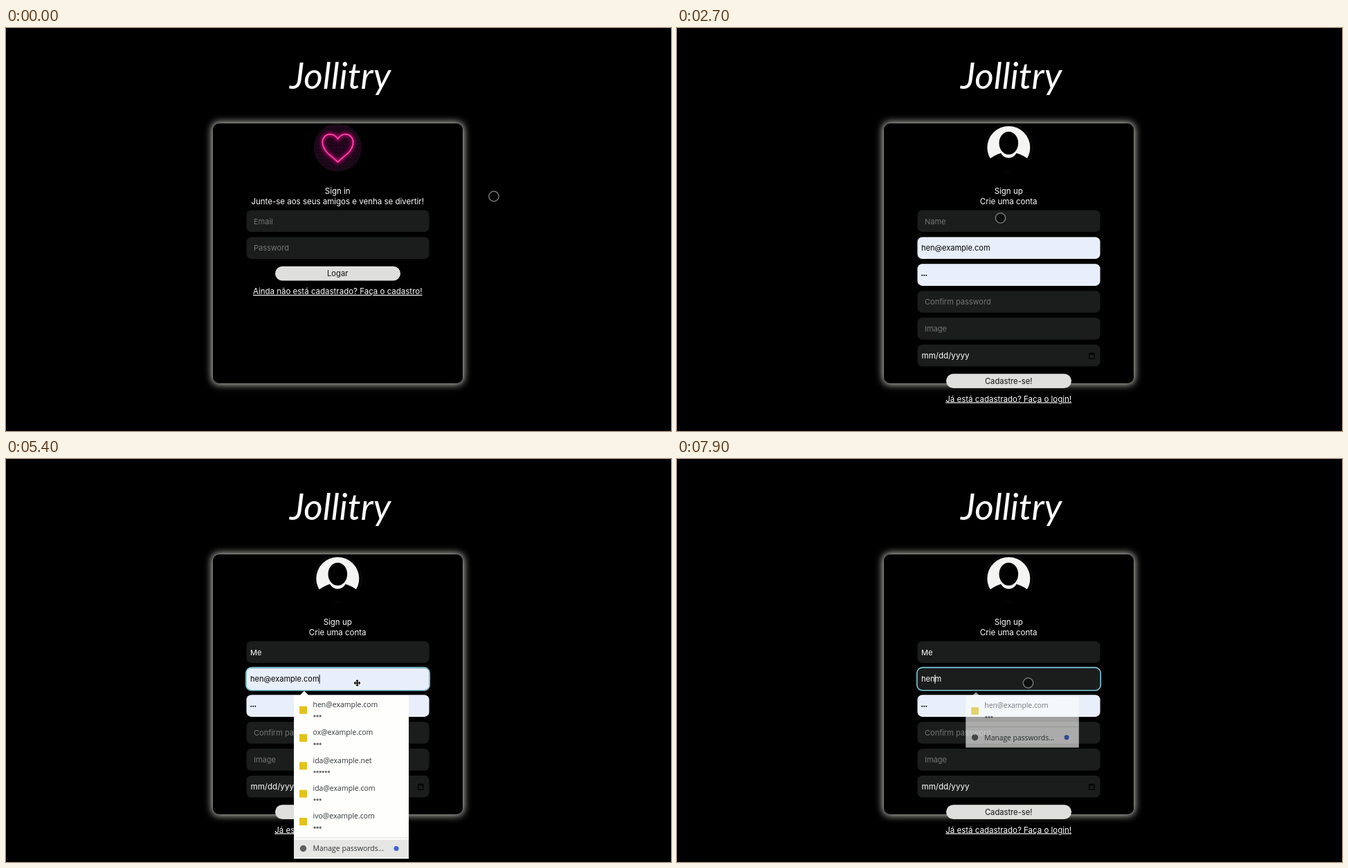
An HTML page that plays this animation: 961x583 px, repeating every 8 s.

```html
<!DOCTYPE html>
<html lang="pt">
<head>
<meta charset="utf-8">
<style>
  html, body { margin: 0; width: 100%; height: 100%; overflow: hidden; background: #000; }
  svg { display: block; position: relative; font: 11.5px Inter, sans-serif; fill: #fff; }
  .card { position: absolute; left: 299px; top: 138px; width: 361px; height: 376px;
          border-radius: 9px; box-shadow: 0 0 11px 1.5px #cfcfc6; background: #000; }
  .title { font: italic 53px Lato, sans-serif; }
  .mid { text-anchor: middle; }
  .link { text-decoration: underline; }
  .field { font-size: 11px; }
  .label { font-size: 11.2px; fill: #111; }
  .hint { fill: #757575; }
  .popup { font: 10.5px "Open Sans", sans-serif; fill: #2e3436; transform-origin: 499px 450px; }
</style>
</head>
<body>
<div class="card"></div>
<svg id="stage" width="961" height="583" viewBox="0 0 961 583"></svg>
<script>
const LOOP = 8000, EMAIL = 'hen@example.com';
const SAVED = [[EMAIL, 3], ['ox@example.com', 3], ['ida@example.net', 6], ['ida@example.com', 3], ['ivo@example.com', 3]];
const rowY = i => 263.5 + i * 38.9;

const text = (x, y, s, attrs = '') => `<text x="${x}" y="${y}" ${attrs}>${s}</text>`;
const rect = (x, y, w, h, r, attrs) => `<rect x="${x}" y="${y}" width="${w}" height="${h}" rx="${r}" ${attrs}/>`;
const centered = (y, s, cls = '') => text(479.2, y, s, `class="mid ${cls}"`);
const box = (i, attrs = 'fill="#1b1d1d"') => rect(347.5, rowY(i), 264, 31.6, 7, attrs);
const value = (i, s, attrs, x = 353) => text(x, rowY(i) + 20, s, `class="field" ${attrs}`);
const hint = (i, s, id = '') => text(358, rowY(i) + 20, s, `class="field hint" id="${id}"`);
const ring = i => rect(346.8, rowY(i) - .8, 265.4, 33.2, 8, `id="ring${i}" fill="none" stroke="#7fd0df" stroke-width="1.6"`);
const button = (y, s) => rect(389, y, 181, 20.8, 10.4, 'fill="#dfe0de"') + centered(y + 14.5, s, 'label');
const dots = (x, y, n, step, r, attrs) =>
  Array.from({length: n}, (_, i) => `<circle cx="${x + i * step}" cy="${y}" r="${r}" ${attrs}/>`).join('');

function popup(id, count) {
  const sep = 547.5 - (5 - count) * 40.35, bottom = sep + 30.8;
  const rows = SAVED.slice(0, count).map(([mail, n], i) => {
    const y = 342 + i * 40.35;
    return rect(424, y + 15.7, 11, 11, 0, 'fill="#e3c21c"') + text(443.5, y + 17, mail) +
      dots(446, y + 29.8, n, 4.1, 1.6, 'fill="#666"');
  }).join('');
  return `<g id="${id}" class="popup">
    <path d="M416 342H424.5L431 335.5L437.5 342H582V${bottom}H416Z" fill="#fefefc"/>
    ${rect(416, 505, 166, 40, 0, `id="${id}Row" fill="#e6e6e4" display="none"`)}
    ${rect(416, sep + 3.3, 166, 25.5, 0, `id="${id}Manage" fill="#e6e6e4" display="none"`)}
    ${rows}
    ${rect(416, sep, 166, 1, 0, 'fill="#dededc"')}
    <circle cx="429.5" cy="${sep + 16}" r="4.7" fill="#5c5f61"/>
    ${text(443.5, sep + 19.8, 'Manage passwords…')}
    <circle cx="564" cy="${sep + 16}" r="3.5" fill="#3f64d8"/>
  </g>`;
}

const heart = `M479.5 160.5C475 153 466 151.5 460.5 157C455 163 457.5 172 462 178C467 184 474 188 479.5 194
  C485 188 492 184 497 178C501.5 172 504 163 498.5 157C493 151.5 484 153 479.5 160.5Z`;

stage.innerHTML = `
<defs>
  <filter id="glow" x="-50%" y="-50%" width="200%" height="200%"><feGaussianBlur stdDeviation="2.8"/></filter>
  <radialGradient id="wall"><stop stop-color="#2a0320"/><stop offset="1" stop-color="#1b0a1a"/></radialGradient>
  <pattern id="brick" width="10" height="5" patternUnits="userSpaceOnUse">
    <path d="M0 .5H10M2.5 0V2.5M7.5 2.5V5" stroke="#000" stroke-opacity=".3" stroke-width=".8"/></pattern>
</defs>
${text(483, 88, 'Jollitry', 'class="title mid"')}
<g id="login">
  <circle cx="479.3" cy="173" r="34.7" fill="url(#wall)"/>
  <circle cx="479.3" cy="173" r="34.7" fill="url(#brick)"/>
  <g fill="none">
    <path d="${heart}" stroke="#c00a72" stroke-width="4.5" filter="url(#glow)"/>
    <path d="${heart}" stroke="#f0208f" stroke-width="1.9"/>
    <path d="${heart}" stroke="#ff8fca" stroke-width=".6"/>
  </g>
  ${centered(240, 'Sign in')}
  ${centered(254.5, 'Junte-se aos seus amigos e venha se divertir!')}
  ${box(0)}${hint(0, 'Email')}
  ${box(1)}${hint(1, 'Password')}
  ${button(344.8, 'Logar')}
  ${centered(385, 'Ainda não está cadastrado? Faça o cadastro!', 'link')}
</g>
<g id="signup">
  <circle cx="479.3" cy="173" r="34.3" fill="none" stroke="#141414"/>
  <circle cx="479.3" cy="173" r="31" fill="#f4f4f2"/>
  <g fill="#000">
    <ellipse cx="479.3" cy="166.5" rx="13.8" ry="16.5"/>
    <path d="M450 191Q458 184 468 181Q472 188 479.3 188Q486.6 188 490.6 181Q501 184 509 191V207H450Z"/>
  </g>
  ${centered(240, 'Sign up')}
  ${centered(254.5, 'Crie uma conta')}
  ${[0, 1, 2, 3, 4, 5].map(i => box(i)).join('')}
  ${box(1, 'id="fill1" fill="#e8effb"')}${box(2, 'id="fill2" fill="#e8effb"')}
  ${hint(0, 'Name', 'nameHint')}${hint(1, 'Email', 'mailHint')}${hint(2, 'Password', 'passHint')}
  ${hint(3, 'Confirm password')}${hint(4, 'Image')}
  ${value(0, '', 'id="nameText"')}${value(1, '', 'id="mailText"')}
  <g id="passDots">${dots(354.2, 357.7, 3, 3, 1, '')}</g>
  ${value(5, 'mm/dd/yyyy', 'style="font-size:11.6px"', 353.5)}
  <path d="M595.8 470.8H603V478.4H595.8ZM595.8 472H603M597.4 469.3V471M601.4 469.3V471" fill="none" stroke="#000" stroke-width="1.2"/>
  ${button(500.3, 'Cadastre-se!')}
  ${centered(540.5, 'Já está cadastrado? Faça o login!', 'link')}
  ${ring(0)}${ring(1)}
  <rect id="caret" width="1" height="13"/>
  ${popup('full', 5)}${popup('short', 1)}
</g>
<g id="cursor">
  <circle id="dot" r="7.2" fill="#000" fill-opacity=".55" stroke="#787878" stroke-width="1.4"/>
  <path id="cross" d="M-5 0L-2.5-2.5V-.8H-.8V-2.5H-2.5L0-5L2.5-2.5H.8V-.8H2.5V-2.5L5 0L2.5 2.5V.8H.8V2.5H2.5L0 5L-2.5 2.5H-.8V.8H-2.5V2.5Z"
    fill="#000" stroke="#fff" stroke-width="1.2" paint-order="stroke"/>
</g>`;

// Key times with values; linear between keys.
const cursorPath = [
  [400, 705, 243.5], [500, 678, 298], [600, 678, 298], [700, 658, 275], [800, 612, 322], [900, 569, 367],
  [1000, 569, 367], [1600, 441, 381], [2000, 441, 381], [2100, 436, 345], [2200, 436, 345], [2300, 428, 302.5],
  [2500, 436, 276], [2600, 436, 276], [3000, 562, 271.5], [4200, 562, 271.5], [4300, 556, 290],
  [4400, 535, 330], [4500, 514, 351], [4600, 509, 336], [4700, 507.5, 324]];
const autofill = [[2200, 0], [2300, .36], [2500, 1], [6800, 1], [6900, .57], [7000, 0]];
const fullAlpha = [[5100, 0], [5200, .6], [5300, .6], [5400, 1], [6800, 1], [6900, .85], [7000, 0]];

function track(keys, t) {
  const next = keys.findIndex(k => k[0] > t);
  if (next === 0) return keys[0].slice(1);
  if (next < 0) return keys[keys.length - 1].slice(1);
  const a = keys[next - 1], b = keys[next], p = (t - a[0]) / (b[0] - a[0]);
  return a.slice(1).map((v, i) => v + (b[i + 1] - v) * p);
}

const $ = id => document.getElementById(id);
const show = (id, on) => $(id).setAttribute('display', on ? 'inline' : 'none');
const grey = p => { const v = Math.round(255 * (1 - p)); return `rgb(${v},${v},${v})`; };

function setPopup(id, alpha) {
  show(id, alpha > 0);
  $(id).style.opacity = alpha;
  $(id).style.transform = `scale(${1 - (1 - alpha) * .04})`;
}

function draw(t) {
  const [x, y] = track(cursorPath, t), moving = t >= 4900 && t < 6700;
  $('cursor').setAttribute('transform', `translate(${x} ${y})`);
  show('dot', !moving);
  show('cross', moving);
  show('login', t < 2000);
  show('signup', t >= 2000);
  if (t < 2000) return;

  const [mailFill] = track(autofill, t), passFill = t < 2500 ? mailFill : 1;
  const filled = t >= 2300, onMail = t >= 5200;
  const removed = t < 6900 ? 0 : t < 7200 ? 1 : t < 7700 ? 2 : 2 + 3 * (t - 7600) / 100;
  const kept = 14 - removed;
  $('fill1').setAttribute('opacity', mailFill);
  $('fill2').setAttribute('opacity', passFill);
  $('mailText').setAttribute('fill', grey(mailFill));
  $('passDots').setAttribute('fill', grey(passFill));
  $('nameText').textContent = t < 3600 ? '' : t < 4000 ? 'M' : 'Me';
  $('mailText').textContent = filled ? EMAIL.slice(0, kept) + EMAIL.slice(14) : '';
  show('nameHint', t < 3600);
  show('mailHint', !filled);
  show('passHint', !filled);
  show('passDots', filled);

  show('ring0', t >= 3000 && !onMail);
  show('ring1', onMail);
  $('ring1').setAttribute('opacity', t < 5400 ? .6 : 1);
  const field = $(onMail ? 'mailText' : 'nameText');
  const chars = onMail && t >= 6800 ? kept : field.textContent.length;
  show('caret', t >= 3000);
  $('caret').setAttribute('x', 353 + (chars ? field.getSubStringLength(0, chars) : 0));
  $('caret').setAttribute('y', rowY(onMail ? 1 : 0) + 9.5);
  $('caret').setAttribute('fill', grey(onMail ? mailFill : 0));

  setPopup('full', track(fullAlpha, t)[0]);
  setPopup('short', t >= 7900 ? .63 : 0);
  show('fullManage', t >= 5400 && t < 6400);
  show('fullRow', t >= 6400 && t < 6700);
}

function tick() {
  draw(Math.floor(performance.now() % LOOP / 100) * 100);
  requestAnimationFrame(tick);
}
tick();
</script>
</body>
</html>
```
